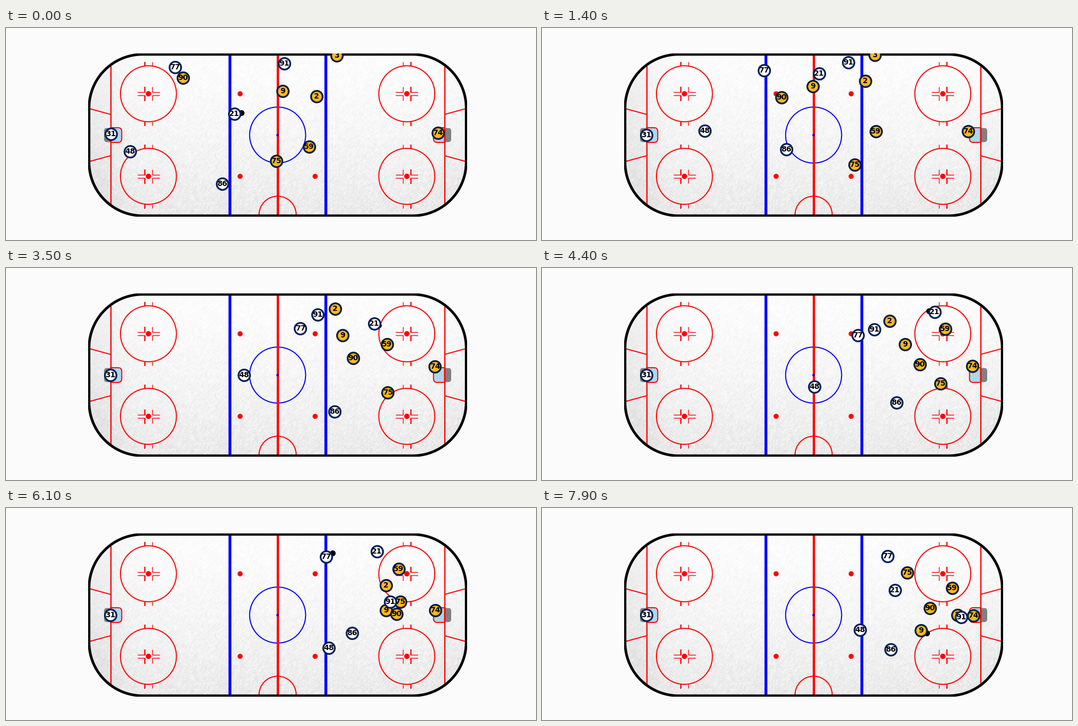
These frames come from a looping animation (1000x400 px, 8 s). A matplotlib script:

```python
import numpy as np
import matplotlib.pyplot as plt
from matplotlib.animation import FuncAnimation
from matplotlib.patches import Arc, Circle, Polygon, Rectangle

W, H, DPI = 1000, 400, 100
FRAMES, STEP = 80, 100
FT = 308 / 87             # pixels per foot
CX, CY = 512.5, 202
PX = 72 / DPI             # points per pixel
INCH2 = 2 / 12            # painted thin lines, in feet
THIN = INCH2 * FT * PX + 1
BEATS = (0, 1.4, 4.4, 6.1, 7.9)

fig = plt.figure(figsize=(W / DPI, H / DPI), dpi=DPI, facecolor="#fbfbfb")
ax = fig.add_axes([0, 0, 1, 1])
ax.set_xlim(0, W)
ax.set_ylim(H, 0)
ax.axis("off")


def at(x, y):
    """Feet from centre ice to pixels."""
    return CX + x * FT, CY + y * FT


def rounded(x, half_w, half_h, r, lo=-200, hi=200):
    """Rounded box centred at (x, 0), cut off left of lo and right of hi."""
    pts = []
    for k, (sx, sy) in enumerate([(1, 1), (-1, 1), (-1, -1), (1, -1)]):
        for a in np.linspace(k, k + 1, 30) * np.pi / 2:
            px = x + sx * (half_w - r) + r * np.cos(a)
            pts.append(at(np.clip(px, lo, hi), sy * (half_h - r) + r * np.sin(a)))
    return pts


def boards(grow):
    return rounded(0, 100 + grow, 42.5 + grow, 28 + grow)


ice = Polygon(boards(0.5), fc="none", ec="none")
view = Rectangle(at(-101, -43.5), 202 * FT, 87 * FT, fc="none", ec="none")
ax.add_patch(ice)
ax.add_patch(view)


def put(patch, clip=ice):
    ax.add_patch(patch)
    patch.set_clip_path(clip)


def bar(x0, y0, x1, y1, color="red", z=3):
    (a, b), (c, d) = at(x0, y0), at(x1, y1)
    put(Rectangle((a, b), c - a, d - b, fc=color, ec=color, lw=1, zorder=z))


def ring(x, y, r, color="red"):
    put(Circle(at(x, y), (r - INCH2 / 2) * FT, fill=False, ec=color,
               lw=THIN, zorder=3))


def dot(x, y, px, color="red"):
    put(Circle(at(x, y), px, fc=color, ec="none", zorder=5))


def streaks(noise, angle, n):
    """Smear noise along a direction, which leaves scratches."""
    dx, dy = np.cos(angle), np.sin(angle)
    return sum(np.roll(noise, (round(k * dy), round(k * dx)), (0, 1))
               for k in range(n)) / n ** 0.5


def draw_ice():
    rng = np.random.default_rng(12)
    h, w = 308, 715
    v, u = np.mgrid[0:1:h * 1j, 0:1:w * 1j]
    shade = 0.985 - 0.07 * v ** 1.5 - 0.05 * np.exp(-(u / 0.09) ** 2)
    shade -= 0.03 * v * np.exp(-((1 - u) / 0.09) ** 2)
    grain = sum(streaks(rng.normal(0, 1, (h, w)), a, 9)
                for a in (-0.9, 0.7, -1.3, -0.4))
    shade += grain * (0.003 + 0.007 * v)
    img = ax.imshow(np.clip(shade, 0, 1), cmap="gray", vmin=0, vmax=1,
                    extent=[155, 870, 356, 48], aspect="auto", zorder=1)
    img.set_clip_path(ice)


def draw_end(s):
    """Markings of one end; s is -1 for left and 1 for right."""
    inner = dict(hi=89) if s > 0 else dict(lo=-89)
    outer = dict(lo=89) if s > 0 else dict(hi=-89)
    put(Polygon(rounded(s * 89, 3.5, 3.75, 1.4, **outer), fc="gray",
                ec="none", zorder=2.5))
    put(Polygon(rounded(s * 89, 5.92, 3.92, 1.8, **inner), fc="lightblue",
                ec="red", lw=THIN, zorder=2.8))
    bar(s * 89 - INCH2 / 2, -43, s * 89 + INCH2 / 2, 43)
    bar(s * 25.5 - 0.5, -43, s * 25.5 + 0.5, 43, "blue", 4)
    for t in (-1, 1):
        put(Polygon([at(s * 89, t * 11), at(s * 100, t * 14)], closed=False,
                    ec="red", lw=THIN, zorder=3))
        cx, cy = s * 68.85, t * 22
        ring(cx, cy, 15)
        dot(cx, cy, 5)
        dot(s * 20, cy, 4.8)
        for i in (-1, 1):
            for j in (-1, 1):
                x, y = cx + i * 2, cy + j * 0.75
                bar(x, y, x + i * 4, y + j * INCH2)
                bar(x, y, x + i * INCH2, y + j * 3)
                bar(x, cy + j * 15, x + i * INCH2, cy + j * 17)


draw_ice()
draw_end(-1)
draw_end(1)
bar(-0.5, -43, 0.5, 43, "red", 4)
ring(0, 0, 15, "blue")
dot(0, 0, 2.4, "blue")
put(Arc(at(0, 42.5), 19.8 * FT, 19.8 * FT, theta1=180, theta2=360,
        ec="red", lw=THIN, zorder=3))
put(Polygon(boards(0.5), fill=False, ec="black", lw=FT * PX + 1, zorder=6), view)


def curve(t, p):
    """Smooth path through points p at times t, sampled once per frame."""
    t, p = np.array(t, float), np.array(p, float)
    m = np.gradient(p, t, axis=0)
    now = np.arange(FRAMES) * STEP / 1000
    k = np.clip(np.searchsorted(t, now, side="right") - 1, 0, len(t) - 2)
    d = (t[k + 1] - t[k])[:, None]
    u = np.clip((now - t[k])[:, None] / d, 0, 1)
    return ((1 + 2 * u) * (1 - u) ** 2 * p[k] + u * (1 - u) ** 2 * d * m[k]
            + u * u * (3 - 2 * u) * p[k + 1] + u * u * (u - 1) * d * m[k + 1])


class Skater:
    count = 0

    def __init__(self, number, kit, pts, times=BEATS):
        self.path = curve(times, pts)
        Skater.count += 1
        z = 10 + Skater.count
        fill, edge = kit
        self.disc, = ax.plot([], [], "o", ms=21.8 * PX, mfc=fill, mec=edge,
                             mew=3.3 * PX, zorder=z)
        self.label = ax.text(0, 0, str(number), ha="center", va="center",
                             fontsize=10, fontweight="bold", color="black",
                             family="DejaVu Sans", zorder=z + 0.5, clip_on=True)
        for art in (self.disc, self.label):
            art.set_clip_path(view)

    def move(self, i):
        x, y = self.path[i]
        self.disc.set_data([x], [y])
        self.label.set_position((x, y))


GOLD = ("#ffb81c", "#041e42")
WHITE = ("white", "#00205b")

# Waypoints of each skater, later ones drawn on top.
skaters = {n: Skater(n, *rest) for n, *rest in [
    (3, GOLD, [(624, 52), (628, 51)], (0, 1.4)),
    (9, GOLD, [(522, 119), (511, 110), (685, 144), (717, 193), (715, 231)]),
    (2, GOLD, [(586, 129), (610, 100), (594, 68), (656, 100), (784, 202)],
     (0, 1.4, 2.4, 4.4, 7.9)),
    (90, GOLD, [(334, 94), (452, 131), (713, 182), (737, 200), (732, 189)]),
    (59, GOLD, [(572, 224), (719, 144), (761, 115), (741, 115), (774, 151)],
     (0, 3.5, 4.4, 6.1, 7.9)),
    (75, GOLD, [(510, 251), (590, 258), (752, 218), (744, 177), (689, 122)]),
    (74, GOLD, [(815, 198), (804, 195), (812, 185), (810, 193), (814, 203)]),
    (31, WHITE, [(198, 200), (197, 202)], (0, 1.4)),
    (48, WHITE, [(234, 233), (307, 194), (449, 202), (609, 264), (600, 230)],
     (0, 1.4, 3.5, 6.1, 7.9)),
    (86, WHITE, [(408, 294), (461, 229), (620, 271), (669, 254), (653, 236),
                 (658, 267)], (0, 1.4, 3.5, 4.4, 6.1, 7.9)),
    (77, WHITE, [(319, 74), (486, 88), (596, 127), (604, 92), (652, 91)],
     (0, 2.4, 4.4, 6.1, 7.9)),
    (21, WHITE, [(431, 162), (523, 86), (695, 105), (741, 83), (700, 82),
                 (666, 155)], (0, 1.4, 3.5, 4.4, 6.1, 7.9)),
    (91, WHITE, [(525, 67), (578, 65), (588, 88), (725, 177), (791, 206)],
     (0, 1.4, 3.5, 6.1, 7.9)),
]}
skaters[3].path[17:, 1] = -50     # leaves the ice

# Who has the puck when, and where it lies beside the player.
TOUCHES = [(0, 21, 13, -2), (1.4, 21, 2, 0), (2.4, 21, 9, -4), (3.5, 21, 8, 3),
           (4.4, 21, -11, -2), (5.2, 21, -11, -2), (5.8, 77, 12, -7),
           (6.6, 77, 12, -7), (7.1, 74, -14, 0), (7.9, 9, 11, 5)]
puck, = ax.plot([], [], "o", ms=11 * PX, color="black", mew=0, zorder=9)
puck.set_clip_path(view)


def puck_at(i):
    t = i * STEP / 1000
    for (t0, n0, *d0), (t1, n1, *d1) in zip(TOUCHES, TOUCHES[1:]):
        if t <= t1:
            u = (t - t0) / (t1 - t0)
            return ((1 - u) * (skaters[n0].path[i] + d0)
                    + u * (skaters[n1].path[i] + d1))


def draw(i):
    for s in skaters.values():
        s.move(i)
    x, y = puck_at(i)
    puck.set_data([x], [y])
    return [puck] + [a for s in skaters.values() for a in (s.disc, s.label)]


anim = FuncAnimation(fig, draw, frames=FRAMES, interval=STEP,
                     init_func=lambda: draw(0), repeat=True, repeat_delay=0)
plt.show()
```
